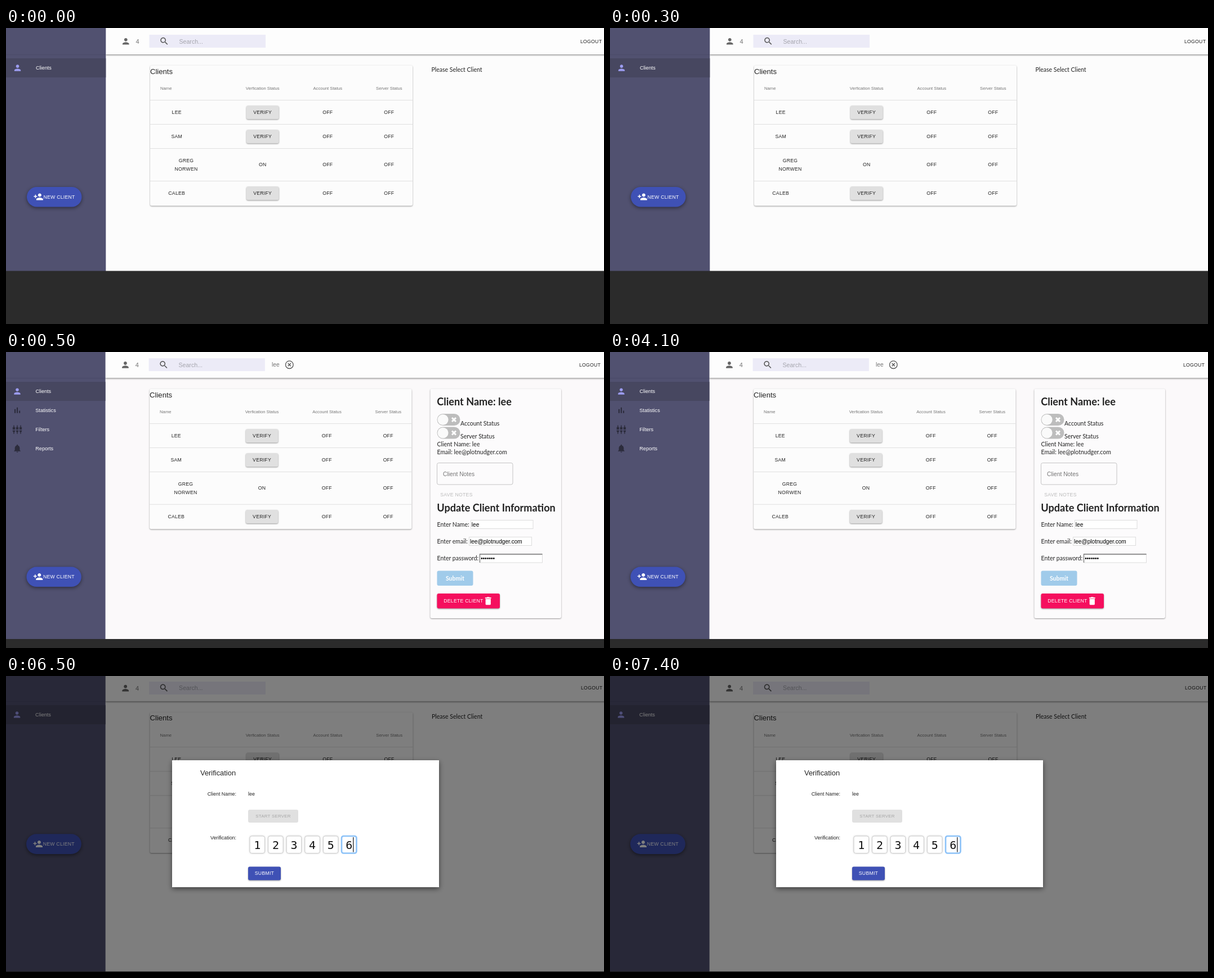
Recreate the animation shown at these times as an HTML page. Size 1062 px wide and 527 px high, loop 8000 ms.

```html
<!DOCTYPE html>
<html lang="en">
<head>
<meta charset="utf-8">
<title>Client dashboard</title>
<style>
html, body { margin: 0; width: 100%; height: 100%; overflow: hidden; background: #2b2b2b; }
svg { display: block; }
#stage { width: 1062px; height: 527px; font-family: "Liberation Sans", Arial, sans-serif; fill: #222; }

/* hard cuts between three views: list, detail, dialog */
#app, #page, #below, #fab, .list, .detail, .dialog { animation: 8s step-end infinite; }
#app { animation-name: settle; }
#page { animation-name: tint; }
#below { animation-name: below; }
#fab { animation-name: fab; }
.list { animation-name: list; }
.detail { animation-name: detail; }
.dialog { animation-name: dialog; }
@keyframes settle {
  0% { transform: none; }
  6.25% { transform: translate(-.5px, -.8px) scale(.9985); }
  81.25% { transform: translate(-1px, -2.2px) scale(1.002); }
}
@keyframes tint { 0% { fill: #fcfcfc; } 6.25% { fill: #fbf9fa; } 81.25% { fill: #fcfcfc; } }
@keyframes below {
  0% { transform: translateY(432.5px); }
  6.25% { transform: translateY(511px); }
  81.25% { transform: translateY(526px); }
}
@keyframes fab { 0% { transform: none; } 6.25% { transform: translateY(101px); } 81.25% { transform: none; } }
@keyframes list { 0% { visibility: visible; } 6.25% { visibility: hidden; } 81.25% { visibility: visible; } }
@keyframes detail { 0% { visibility: hidden; } 6.25% { visibility: visible; } 81.25% { visibility: hidden; } }
@keyframes dialog { 0%, 6.25% { visibility: hidden; } 81.25% { visibility: visible; } }

.mid { text-anchor: middle; }
.end { text-anchor: end; }
.caps { font-size: 8.7px; letter-spacing: .25px; }
.head { font-size: 7.7px; fill: #757575; }
.menu { font-size: 9.1px; fill: #fff; }
.form { font-size: 8.9px; }
.lato { font-family: Lato, sans-serif; font-size: 10.5px; }
.title { font-size: 18.1px; font-weight: 700; }
.input { font-size: 10.1px; fill: #000; }
.digits { font: 20px "DejaVu Sans Mono", monospace; fill: #111; }
.white { fill: #fff; }
.raised { filter: drop-shadow(0 1px 1px rgba(0, 0, 0, .4)); }
.float { filter: drop-shadow(0 2px 3px rgba(0, 0, 0, .45)); }
.field { fill: #fff; stroke: #ddd; }
</style>
</head>
<body>
<svg id="stage" viewBox="0 0 1062 527">
  <defs>
    <symbol id="person" viewBox="0 0 24 24"><path d="M12 12c2.21 0 4-1.79 4-4s-1.79-4-4-4-4 1.79-4 4 1.79 4 4 4zm0 2c-2.67 0-8 1.34-8 4v2h16v-2c0-2.66-5.33-4-8-4z"/></symbol>
    <symbol id="add" viewBox="0 0 24 24"><path d="M15 12c2.21 0 4-1.79 4-4s-1.79-4-4-4-4 1.79-4 4 1.79 4 4 4zm-9-2V7H4v3H1v2h3v3h2v-3h3v-2H6zm9 4c-2.67 0-8 1.34-8 4v2h16v-2c0-2.66-5.33-4-8-4z"/></symbol>
    <symbol id="search" viewBox="0 0 24 24"><path d="M15.5 14h-.79l-.28-.27C15.41 12.59 16 11.11 16 9.5 16 5.91 13.09 3 9.5 3S3 5.91 3 9.5 5.91 16 9.5 16c1.61 0 3.09-.59 4.23-1.57l.27.28v.79l5 4.99L20.49 19l-4.99-5zm-6 0C7.01 14 5 11.99 5 9.5S7.01 5 9.5 5 14 7.01 14 9.5 11.99 14 9.5 14z"/></symbol>
    <symbol id="bars" viewBox="0 0 24 24"><path d="M5 9.2h3V19H5zM10.6 5h2.8v14h-2.8zM16.2 13H19v6h-2.8z"/></symbol>
    <symbol id="plug" viewBox="0 0 8 24"><path d="M5 2a1 1 0 0 0-2 0v4H1v6h6V6H5zM1 14v2a3 3 0 0 0 2 2.8V23h2v-4.2A3 3 0 0 0 7 16v-2z"/></symbol>
    <symbol id="bell" viewBox="0 0 24 24"><path d="M12 22c1.1 0 2-.9 2-2h-4c0 1.1.9 2 2 2zm6-6v-5c0-3.07-1.64-5.64-4.5-6.32V4a1.5 1.5 0 0 0-3 0v.68C7.63 5.36 6 7.92 6 11v5l-2 2v1h16v-1z"/></symbol>
    <symbol id="trash" viewBox="0 0 24 24"><path d="M6 19c0 1.1.9 2 2 2h8c1.1 0 2-.9 2-2V7H6zM19 4h-3.5l-1-1h-5l-1 1H5v2h14z"/></symbol>
    <g id="verify">
      <rect class="raised" x="427" y="-11.7" width="57.5" height="24" rx="3" fill="#e0e0e0"/>
      <text class="caps mid" x="455.7" y="3">VERIFY</text>
    </g>
    <g id="off" class="caps mid">
      <text x="571.2" y="3">OFF</text><text x="680.2" y="3">OFF</text>
    </g>
    <g id="toggle">
      <rect width="41" height="21" rx="10.5" fill="#bdbdbd"/>
      <circle cx="10.5" cy="10.5" r="9.6" fill="#fafafa"/>
      <path d="M26.5 7l7 7m0-7l-7 7" stroke="#fff" stroke-width="3"/>
    </g>
    <rect id="cell" x="433" y="285" width="26.5" height="30.5" rx="3.5"/>
  </defs>

  <rect id="page" width="1062" height="527" fill="#fcfcfc"/>

  <g id="app">
    <rect x="177" y="-9" width="900" height="56" fill="#fdfdfd" style="filter:drop-shadow(0 1px 1.5px rgba(0,0,0,.55))"/>
    <rect x="-9" y="-9" width="186.3" height="560" fill="#515170"/>
    <path d="M-9 47.5H177" stroke="#4b4b68"/>
    <rect x="-9" y="54" width="186.3" height="34" fill="#474760"/>
    <use href="#person" x="12" y="62.5" width="17" height="17" fill="#9c9cf0"/>
    <text class="menu" x="53" y="74.2">Clients</text>

    <g id="fab">
      <rect class="float" x="37" y="283" width="97.5" height="35.5" rx="17.7" fill="#3f51b5"/>
      <use class="white" href="#add" x="48.6" y="291.5" width="18" height="18"/>
      <text class="caps white" x="66.5" y="303.8">NEW CLIENT</text>
    </g>

    <use href="#person" x="204" y="15" width="17.5" height="17.5" fill="#666"/>
    <text x="230.6" y="27.8" font-size="11" fill="#757575">4</text>
    <rect x="254.5" y="12" width="206.5" height="23" fill="#ecebf7"/>
    <use href="#search" x="272" y="14.5" width="18" height="18" fill="#555"/>
    <text x="307.5" y="27.5" font-size="10.6" fill="#a5a5ad">Search...</text>
    <text class="caps" x="1020" y="26.6">LOGOUT</text>

    <rect class="raised" x="256" y="66.5" width="466" height="250" rx="3" fill="#fcfcfc"/>
    <text x="256" y="81.5" font-size="13.1">Clients</text>
    <g class="head">
      <text x="274" y="110">Name</text>
      <g class="mid">
        <text x="455.7" y="110">Verfication Status</text>
        <text x="571.3" y="110">Account Status</text>
        <text x="680.3" y="110">Server Status</text>
      </g>
    </g>
    <path d="M256 128.5h466M256 171.5h466M256 214.5h466M256 272.5h466" stroke="#e0e0e0"/>
    <g class="caps mid">
      <text x="303.2" y="153">LEE</text>
      <text x="303.2" y="196">SAM</text>
      <text x="320" y="238.8">GREG</text>
      <text x="320" y="254.3">NORWEN</text>
      <text x="303.2" y="297">CALEB</text>
      <text x="455.7" y="246.2">ON</text>
    </g>
    <use href="#verify" y="150"/>
    <use href="#verify" y="193"/>
    <use href="#verify" y="294"/>
    <use href="#off" y="150"/>
    <use href="#off" y="193"/>
    <use href="#off" y="243.2"/>
    <use href="#off" y="294"/>

    <text class="lato list" x="755.5" y="77.6">Please Select Client</text>
  </g>

  <g class="detail" visibility="hidden">
    <g fill="#2c2c3c">
      <use href="#bars" x="11.3" y="95" width="17.5" height="17.5"/>
      <use href="#plug" x="11" y="129.5" width="6" height="17"/>
      <use href="#plug" x="17" y="129.5" width="6" height="17"/>
      <use href="#plug" x="23" y="129.5" width="6" height="17"/>
      <use href="#bell" x="11.3" y="163" width="17.5" height="17.5"/>
    </g>
    <g class="menu">
      <text x="52.3" y="107.2">Statistics</text>
      <text x="52.3" y="141.2">Filters</text>
      <text x="52.3" y="175.2">Reports</text>
    </g>

    <text x="472" y="25.8" font-size="10.3" fill="#757575">lee</text>
    <circle cx="503.3" cy="22.7" r="6.8" fill="none" stroke="#555" stroke-width="1.3"/>
    <path d="M500.7 20.1l5.2 5.2m0-5.2l-5.2 5.2" stroke="#555" stroke-width="1.4"/>

    <rect class="raised" x="753.5" y="65.5" width="232.5" height="408.5" rx="3" fill="#fcfbfc"/>
    <g class="lato">
      <text class="title" x="765.3" y="95">Client Name: lee</text>
      <use href="#toggle" x="765.5" y="110"/>
      <use href="#toggle" x="765.5" y="133.5"/>
      <text x="807" y="130.6">Account Status</text>
      <text x="807" y="154">Server Status</text>
      <text x="765.5" y="168">Client Name: lee</text>
      <text x="765.5" y="182">Email: lee@plotnudger.com</text>
      <text class="title" x="765.3" y="283.7">Update Client Information</text>
      <text x="765.5" y="310.8">Enter Name:</text>
      <text x="765.5" y="341">Enter email:</text>
      <text x="765.5" y="371.2">Enter password:</text>
    </g>

    <rect x="765.5" y="197.5" width="134.5" height="38.5" rx="3" fill="none" stroke="#c4c4c4"/>
    <text x="776" y="220.7" font-size="10.3" fill="#757575">Client Notes</text>
    <text class="caps" x="771.3" y="256.7" fill="#bbb">SAVE NOTES</text>

    <rect class="field" x="825.5" y="299.5" width="110.5" height="15"/>
    <rect class="field" x="822.5" y="329.5" width="111" height="15"/>
    <rect class="field" x="841.5" y="360" width="111" height="15"/>
    <path d="M841.5 375v-15h111" fill="none" stroke="#767676" stroke-width="1.3"/>
    <g class="input">
      <text x="826.8" y="310.8">lee</text>
      <text x="824" y="341">lee@plotnudger.com</text>
      <text x="843.3" y="371">•••••••</text>
    </g>

    <rect x="765.5" y="389.5" width="64" height="26.5" rx="3" fill="#a0cbea"/>
    <text class="lato mid white" x="797.4" y="406.5" font-weight="700">Submit</text>
    <rect class="raised" x="765.5" y="430" width="111.5" height="26.5" rx="3" fill="#f50f5e"/>
    <text class="caps white" x="777.3" y="446.3">DELETE CLIENT</text>
    <use class="white" href="#trash" x="847" y="434" width="18.5" height="18.5"/>
  </g>

  <rect id="below" width="1062" height="100" fill="#2b2b2b"/>

  <g class="dialog" visibility="hidden">
    <rect width="1062" height="527" fill="#000" opacity=".5"/>
    <rect x="295" y="150" width="474" height="226" fill="#fff" style="filter:drop-shadow(0 3px 5px rgba(0,0,0,.5))"/>
    <text x="345" y="176.6" font-size="12.9">Verification</text>
    <g class="form">
      <text class="end" x="409" y="212.8">Client Name:</text>
      <text x="430" y="212.8">lee</text>
      <text class="end" x="409" y="291.2">Verification:</text>
    </g>
    <rect x="430" y="238" width="89" height="23" rx="3" fill="#e0e0e0"/>
    <text class="caps mid" x="474.5" y="252.4" fill="#a6a6a6" style="font-size:7.9px">START SERVER</text>

    <g fill="#fff" stroke="#ccc" style="filter:drop-shadow(0 0 1.5px rgba(0,0,0,.2))">
      <use href="#cell"/>
      <use href="#cell" x="32.6"/>
      <use href="#cell" x="65.2"/>
      <use href="#cell" x="97.8"/>
      <use href="#cell" x="130.4"/>
    </g>
    <use href="#cell" x="163" fill="#fff" stroke="#8cc2f8" stroke-width="2.6"/>
    <g class="digits mid">
      <text x="446.3" y="307.7">1</text>
      <text x="478.9" y="307.7">2</text>
      <text x="511.5" y="307.7">3</text>
      <text x="544.1" y="307.7">4</text>
      <text x="576.7" y="307.7">5</text>
      <text x="609.3" y="307.7">6</text>
    </g>
    <path d="M616.8 287v26.5" stroke="#111" stroke-width="1.2"/>

    <rect class="raised" x="430" y="339.5" width="58" height="24" rx="3" fill="#3f51b5"/>
    <text class="caps mid white" x="459" y="354.4">SUBMIT</text>
  </g>
</svg>
</body>
</html>
```
